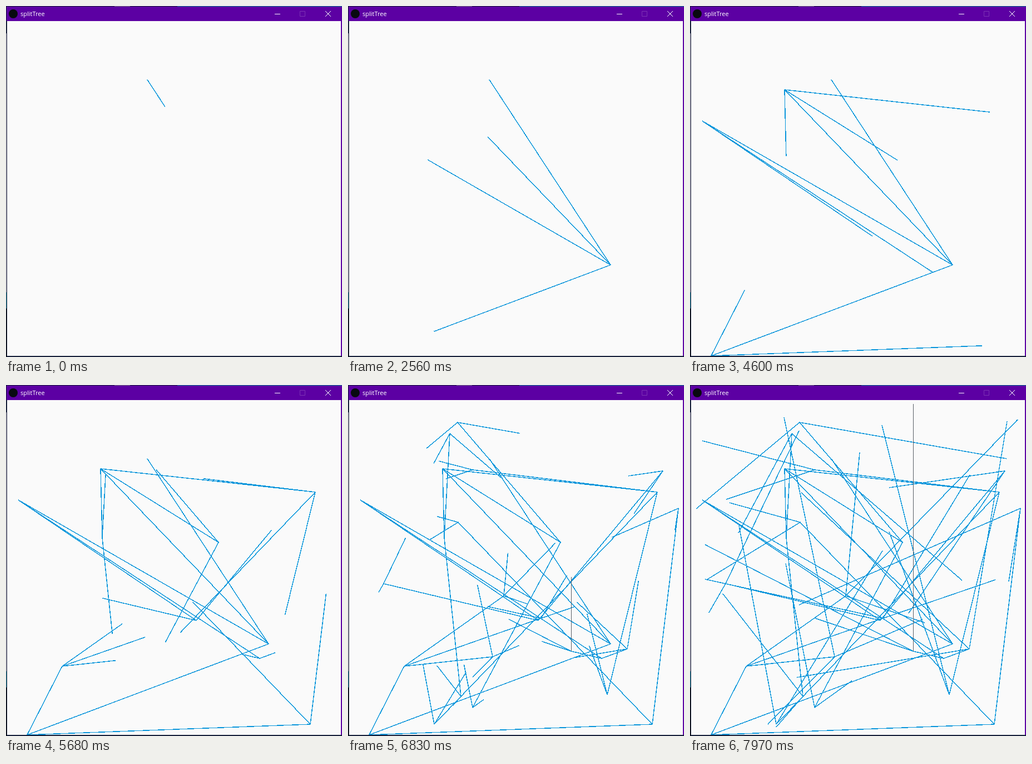
Animation of 604 by 629 pixels, one loop 8000 ms. Source, as an HTML page:

```html
<!DOCTYPE html>
<html lang="en">
<head>
<meta charset="utf-8">
<title>splitTree</title>
<style>
  html, body { margin: 0; width: 100%; height: 100%; overflow: hidden; background: #0d1830; }
  svg { display: block; }
  text { font: 11px "Open Sans", "Noto Sans", sans-serif; fill: #fff; }
</style>
</head>
<body>
<svg width="604" height="629" viewBox="0 0 604 629">
  <clipPath id="view"><rect x="2" y="27" width="600" height="600"/></clipPath>

  <!-- desktop showing around the window -->
  <g shape-rendering="crispEdges">
    <rect width="604" height="629" fill="#17203a"/>
    <rect x="195" width="28" height="1" fill="#70707c"/>
    <rect x="308" width="296" height="1" fill="#087c90"/>
    <rect y="49" width="1" height="464" fill="#b9b3c0"/>
    <rect y="513" width="1" height="29" fill="#2c8ca0"/>
    <rect y="542" width="1" height="87" fill="#050508"/>
    <rect x="602" y="1" width="2" height="626" fill="#5c00a3"/>
    <rect x="1" y="1" width="602" height="26" fill="#5c00a3"/>
    <rect x="2" y="27" width="600" height="600" fill="#fafafa"/>
  </g>

  <!-- title bar -->
  <circle cx="13" cy="14" r="8" fill="#080a10"/>
  <text x="26" y="18">splitTree</text>
  <g fill="none" stroke="#fff">
    <path d="M483 14.5h10"/>
    <path d="M528.5 9.5h9v9h-9z" stroke="#7d33b5"/>
    <path d="M574 9l10 10M584 9l-10 10"/>
  </g>

  <g clip-path="url(#view)" fill="none" shape-rendering="crispEdges">
    <path id="branches" stroke="#0795db" stroke-width="1.45"/>
    <path id="uprights" stroke="#5a5f66"/>
  </g>
</svg>
<script>
const LOOP = 8000;

// Node: x, y, then its children.
const tree = [254, 132, [472, 464,
  [170, 150,
    [173, 274,
      [183, 87, [87, 265], [489, 350]],
      [203, 558, [59, 374], [155, 613]]],
    [382, 282,
      [197, 67, [569, 132], [11, 222]],
      [224, 578, [172, 320], [291, 530]]],
    [556, 192,
      [224, 152, [22, 100], [65, 205]],
      [466, 555, [345, 72], [358, 263]],
      [155, 608, [88, 252], [346, 297]]]],
  [22, 206,
    [342, 422,
      [566, 154, [358, 184], [393, 409]],
      [64, 356, [196, 82], [34, 408]]],
    [456, 490,
      [502, 473, [570, 65], [200, 193], [192, 524]],
      [401, 477, [401, 34], [225, 418], [27, 286]]]],
  [38, 627,
    [101, 504,
      [280, 378, [589, 62], [305, 121], [422, 426]],
      [347, 418, [549, 349], [27, 348], [503, 161]],
      [260, 487, [169, 58], [418, 420], [140, 608]]],
    [547, 608,
      [594, 221, [573, 352], [196, 394]],
      [198, 246, [71, 211], [30, 349]]]]]];

// The picture advances in 11 equal ticks between these times.
const beats = [70, 880, 1730, 2560, 3410, 4280, 5140, 5980, 6830, 7670, 8495];
// Time and number of generations grown by then.
const growth = [[0, .147], [1650, 1.171], [2560, 1.731], [4600, 2.961],
                [5680, 3.609], [6830, 4.3], [7970, 5], [8000, 5]];

function snap(time) {
  const t = time + 8; // absorbs rounding of the tick times
  if (t < beats[0] + 8) return 0;
  const i = beats.findLastIndex(b => b <= t);
  const tick = (beats[i + 1] - beats[i]) / 11;
  return beats[i] + Math.floor((t - beats[i]) / tick) * tick;
}

function generations(t) {
  const i = Math.max(1, growth.findIndex(([time]) => time >= t));
  const [t0, g0] = growth[i - 1], [t1, g1] = growth[i];
  return g0 + (g1 - g0) * (t - t0) / (t1 - t0);
}

function grow([x, y, ...children], amount, paths) {
  if (amount <= 0) return;
  const k = Math.min(1, amount);
  for (const child of children) {
    const [cx, cy] = child;
    const upright = cx === x;
    const shift = upright ? .5 : 0;
    paths[+upright] += `M${x + shift} ${y}L${x + shift + (cx - x) * k} ${y + (cy - y) * k}`;
    grow(child, amount - 1, paths);
  }
}

const branches = document.getElementById("branches");
const uprights = document.getElementById("uprights");

function draw() {
  const paths = ["", ""];
  grow(tree, generations(snap(performance.now() % LOOP)), paths);
  branches.setAttribute("d", paths[0]);
  uprights.setAttribute("d", paths[1]);
  requestAnimationFrame(draw);
}
draw();
</script>
</body>
</html>
```
